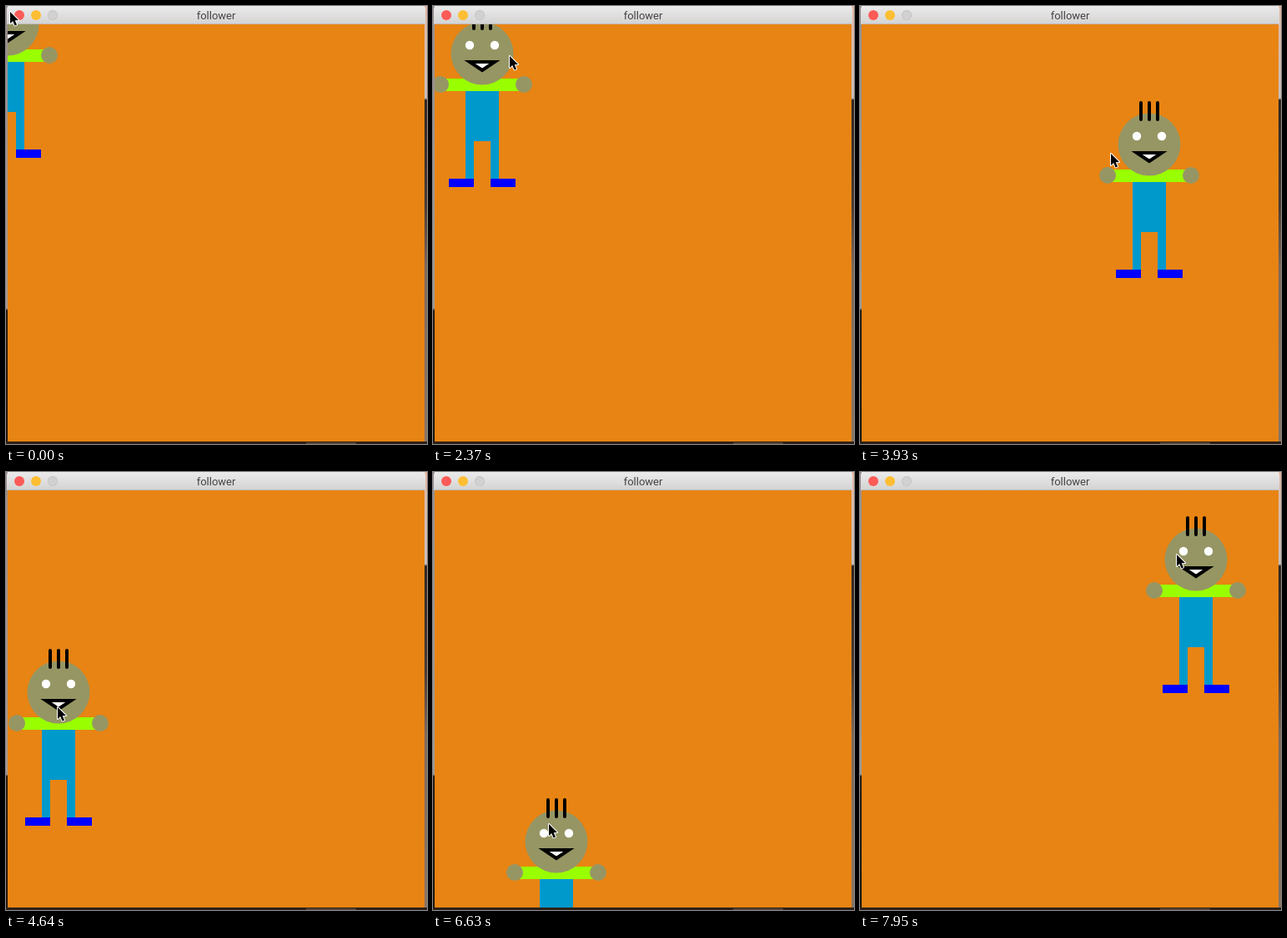
An HTML page with a canvas that plays this animation: 505x525 px, repeating every 8000 ms.

```html
<!DOCTYPE html>
<html lang="en">
<head>
<meta charset="utf-8">
<title>follower</title>
<style>
  html, body { margin: 0; width: 100%; height: 100%; overflow: hidden; }
  canvas { display: block; }
</style>
</head>
<body>
<canvas id="stage" width="505" height="525"></canvas>
<script>
const ctx = document.getElementById('stage').getContext('2d');
const LOOP = 8000, MOVE_START = 1170, STEP_ORIGIN = 1147, STEP = 87;
const SKIN = '#969664', BLACK = '#000', WHITE = '#fff';

// Mouse path: [step, x, y]
const path = [
  [0, 5, 7], [7, 5, 27], [9, 7, 32], [14, 59, 57], [15, 92, 60],
  [19, 210, 70], [24, 379, 78], [25, 392, 82], [29, 426, 131],
  [39, 68, 250], [40, 63, 264], [41, 62, 282], [49, 391, 367],
  [54, 316, 476], [55, 302, 479], [59, 194, 480], [63, 148, 443],
  [64, 139, 422], [69, 330, 223], [78, 403, 105], [79, 380, 99]
];

function slope(i, axis) {
  return (path[i + 1][axis] - path[i][axis]) / (path[i + 1][0] - path[i][0]);
}

function tangent(i, axis) {
  if (i === 0) return slope(0, axis);
  if (i === path.length - 1) return slope(i - 1, axis);
  const before = path[i][0] - path[i - 1][0], after = path[i + 1][0] - path[i][0];
  return (before * slope(i, axis) + after * slope(i - 1, axis)) / (before + after);
}

// Cubic Hermite interpolation through the path, in whole pixels
function mouseAt(step) {
  let i = 0;
  while (i < path.length - 2 && path[i + 1][0] <= step) i++;
  const span = path[i + 1][0] - path[i][0];
  const u = (step - path[i][0]) / span, v = 1 - u;
  return [1, 2].map(axis => Math.round(
    (1 + 2 * u) * v * v * path[i][axis] + u * v * v * span * tangent(i, axis) +
    u * u * (3 - 2 * u) * path[i + 1][axis] - u * u * v * span * tangent(i + 1, axis)));
}

function rect(color, x, y, w, h) {
  ctx.fillStyle = color;
  ctx.fillRect(x, y, w, h);
}

function circle(color, x, y, r) {
  ctx.fillStyle = color;
  ctx.beginPath();
  ctx.arc(x, y, r, 0, Math.PI * 2);
  ctx.fill();
}

function polygon(points) {
  ctx.beginPath();
  points.forEach(p => ctx.lineTo(...p));
  ctx.closePath();
}

function gradient(y0, y1, stops) {
  const g = ctx.createLinearGradient(0, y0, 0, y1);
  stops.forEach(([at, color]) => g.addColorStop(at, color));
  return g;
}

function drawDesktop() {
  rect(gradient(0, 525, [[0, '#9b8f8c'], [0.69, '#a39a94'], [0.695, '#2a1d12'], [1, '#20160e']]), 0, 0, 2, 525);
  rect(gradient(0, 525, [[0, '#e3b9a4'], [0.21, '#c9bdb8'], [0.215, '#33271f'], [0.45, '#493a30'], [0.6, '#80695a'], [1, '#8a7565']]), 502, 0, 3, 525);
  rect('#2e2118', 0, 522, 505, 3);
  rect('#584638', 360, 523, 60, 2);
}

function drawWindow() {
  ctx.fillStyle = gradient(0, 22, [[0, '#ebebeb'], [1, '#d3d3d3']]);
  ctx.beginPath();
  ctx.roundRect(1, 0, 502, 22, [4, 4, 0, 0]);
  ctx.fill();
  rect('#bdb9b5', 2, 21, 500, 1);
  circle('#fc5b57', 16, 11, 6);
  circle('#fdbe33', 36, 11, 6);
  circle('#bfbfbf', 56, 11, 6);
  circle('#d1d1d1', 56, 11, 5.3);
  ctx.fillStyle = '#444';
  ctx.font = '13px Roboto, sans-serif';
  ctx.textAlign = 'center';
  ctx.fillText('follower', 252, 16);
  rect('#e88413', 2, 22, 500, 500);
}

function drawFigure(x, y) {
  ctx.save();
  ctx.beginPath();
  ctx.rect(2, 22, 500, 500);
  ctx.clip();
  ctx.translate(x, y);
  rect('#9f0', -50, 30, 100, 15);
  rect('#09c', -20, 45, 40, 60);
  circle(SKIN, 0, 0, 37.5);
  for (const side of [-1, 1]) {
    circle(SKIN, side * 50, 37, 10);
    circle(WHITE, side * 15, -10, 5.2);
    rect('#09c', side * 15 - 5, 105, 10, 45);
    rect('#00f', side * 25 - 15, 150, 30, 10);
  }
  ctx.strokeStyle = BLACK;
  ctx.lineWidth = 4;
  ctx.lineCap = 'round';
  ctx.lineJoin = 'miter';
  ctx.beginPath();
  for (const hair of [-10, 0, 10]) {
    ctx.moveTo(hair, -50);
    ctx.lineTo(hair, -30);
  }
  ctx.stroke();
  polygon([[-15, 10], [15, 10], [0, 20]]);
  ctx.fillStyle = WHITE;
  ctx.fill();
  ctx.stroke();
  ctx.restore();
}

function drawCursor(x, y) {
  ctx.save();
  ctx.translate(x, y);
  polygon([[0, 0], [0, 14], [3.2, 11], [5.6, 16.4], [8, 15.4], [5.7, 10.2], [10, 10]]);
  ctx.strokeStyle = WHITE;
  ctx.lineWidth = 2;
  ctx.lineJoin = 'round';
  ctx.stroke();
  ctx.fillStyle = BLACK;
  ctx.fill();
  ctx.restore();
}

function draw(now) {
  const t = now % LOOP;
  const step = t < MOVE_START ? -1 : Math.floor((t - STEP_ORIGIN) / STEP);
  // The figure trails the mouse by one step and waits until it enters the window
  let [x, y] = mouseAt(Math.max(step, 0));
  if (y < 22) [x, y] = [2, 22];
  ctx.clearRect(0, 0, 505, 525);
  drawDesktop();
  drawWindow();
  drawFigure(x, y);
  drawCursor(...mouseAt(step + 1));
  requestAnimationFrame(draw);
}
draw(0);
</script>
</body>
</html>
```
